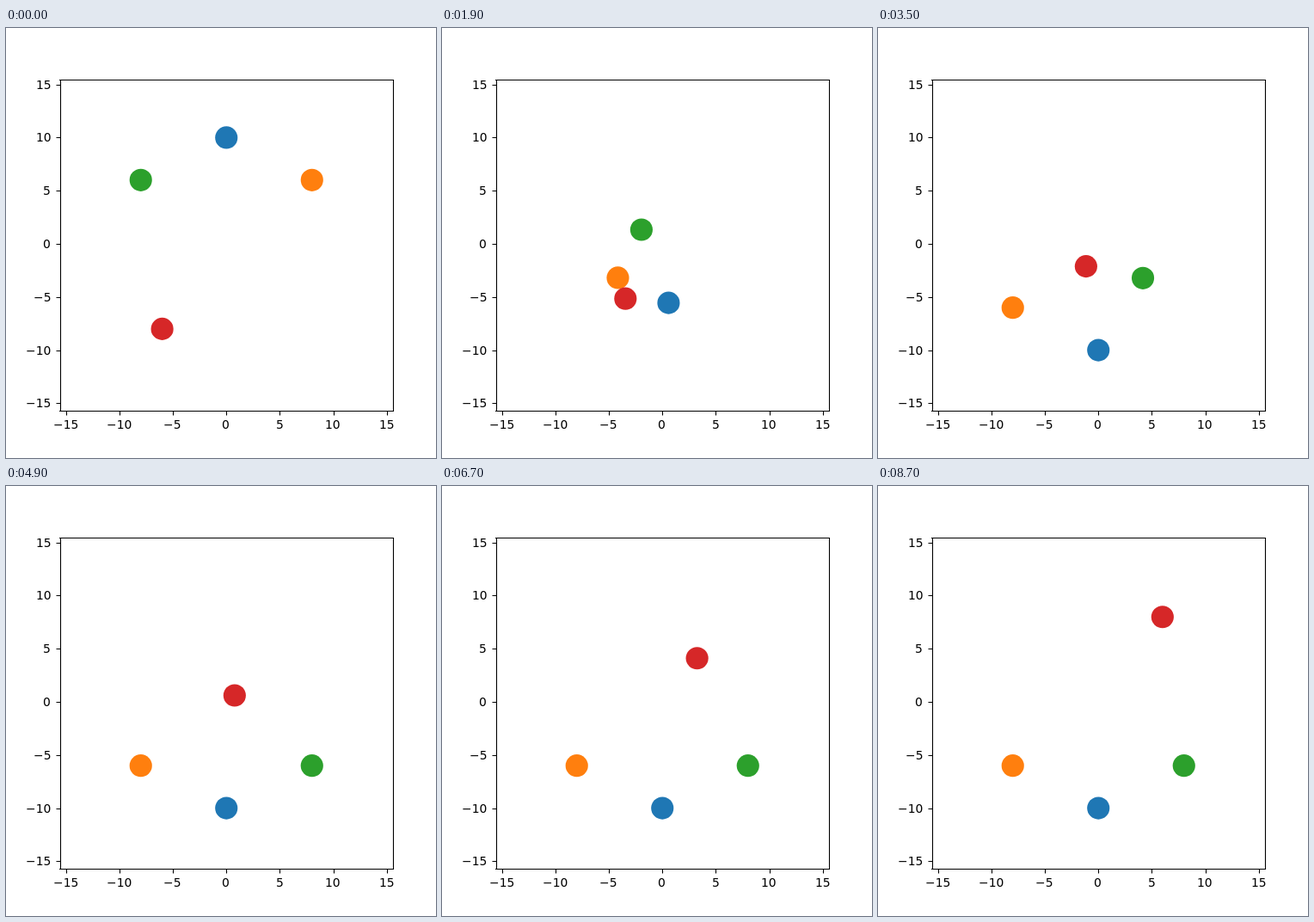
Recreate the animation shown at these times as an HTML page. Size 500x500 px, loop 8.9 s.

```html
<!DOCTYPE html>
<html lang="en">
<head>
<meta charset="utf-8">
<title>Four agents crossing</title>
<style>
  html, body { margin: 0; width: 100%; height: 100%; overflow: hidden; background: #fff; }
  svg { display: block; width: 500px; height: 500px; }
  .axes { fill: none; stroke: #000; stroke-width: 1.11; }
  text { font: 13.89px "DejaVu Sans", sans-serif; fill: #000; }
</style>
</head>
<body>
<svg id="plot" viewBox="0 0 500 500">
  <path class="axes" d="M62 60.5H451M62 445.5H451M63.5 60V446M450.5 60V446"/>
</svg>
<script>
const LOOP = 8900, HOLD = 500, STEP = 200;
const TRIP = 20, TOLERANCE = 0.3;
const plot = document.getElementById('plot');

const px = x => 256.25 + 12.44 * x;
const py = y => 251 - 12.36 * y;
const snap = v => Math.floor(v + 0.5) + 0.5;

function add(tag, attrs, text = '') {
  const el = document.createElementNS('http://www.w3.org/2000/svg', tag);
  for (const key in attrs) el.setAttribute(key, attrs[key]);
  el.textContent = text;
  return plot.appendChild(el);
}

// Text starts on a whole pixel; align 0.5 centres it on x, 1 ends it there
function addLabel(text, x, y, align) {
  const el = add('text', { y }, text);
  el.setAttribute('x', Math.floor(x - align * el.getComputedTextLength()));
}

// Each agent crosses to the opposite point, swerving left by dodge at step peak;
// lag is the number of steps lost to giving way
const agents = [
  { color: '#1f77b4', x: 0, y: 10, speed: 2.36, dodge: 1.5, peak: 5, lag: 1.41 },
  { color: '#ff7f0e', x: 8, y: 6, speed: 1.905, dodge: 0.16, peak: 3, lag: 0 },
  { color: '#2ca02c', x: -8, y: 6, speed: 0.954, dodge: -0.18, peak: 10, lag: 0 },
  { color: '#d62728', x: -6, y: -8, speed: 0.476, dodge: -0.437, peak: 9, lag: 0 }
];

for (const a of agents) a.dot = add('circle', { r: 13.07, fill: a.color });

for (let v = -15; v <= 15; v += 5) {
  const x = snap(px(v)), y = snap(py(v));
  const label = String(v).replace('-', '\u2212');
  add('path', { class: 'axes', d: `M${x} 445.5v5M63.5 ${y}h-5` });
  addLabel(label, px(v), 466, 0.5);
  addLabel(label, 52.78, y + 4.5, 1);
}

function place({ x, y, speed, dodge, peak, lag }, k) {
  const u = Math.min(1, k / peak);
  const end = TRIP / speed + lag;
  const gone = speed * (k - lag * u ** (2 / 3));
  const along = gone > TRIP + TOLERANCE ? TRIP : gone;
  const aside = dodge * (u < 1 ? u ** 2.4 : Math.max(0, (end - k) / (end - peak)));
  const dx = -2 * x / TRIP, dy = -2 * y / TRIP;
  return [x + dx * along - dy * aside, y + dy * along + dx * aside];
}

const start = performance.now();

function draw(now) {
  const t = Math.max(0, now - start) % LOOP;
  const k = t < HOLD ? 0 : 1 + Math.floor((t - HOLD) / STEP);
  for (const agent of agents) {
    const [x, y] = place(agent, k);
    agent.dot.setAttribute('cx', px(x));
    agent.dot.setAttribute('cy', py(y));
  }
  requestAnimationFrame(draw);
}
draw(start);
</script>
</body>
</html>
```
